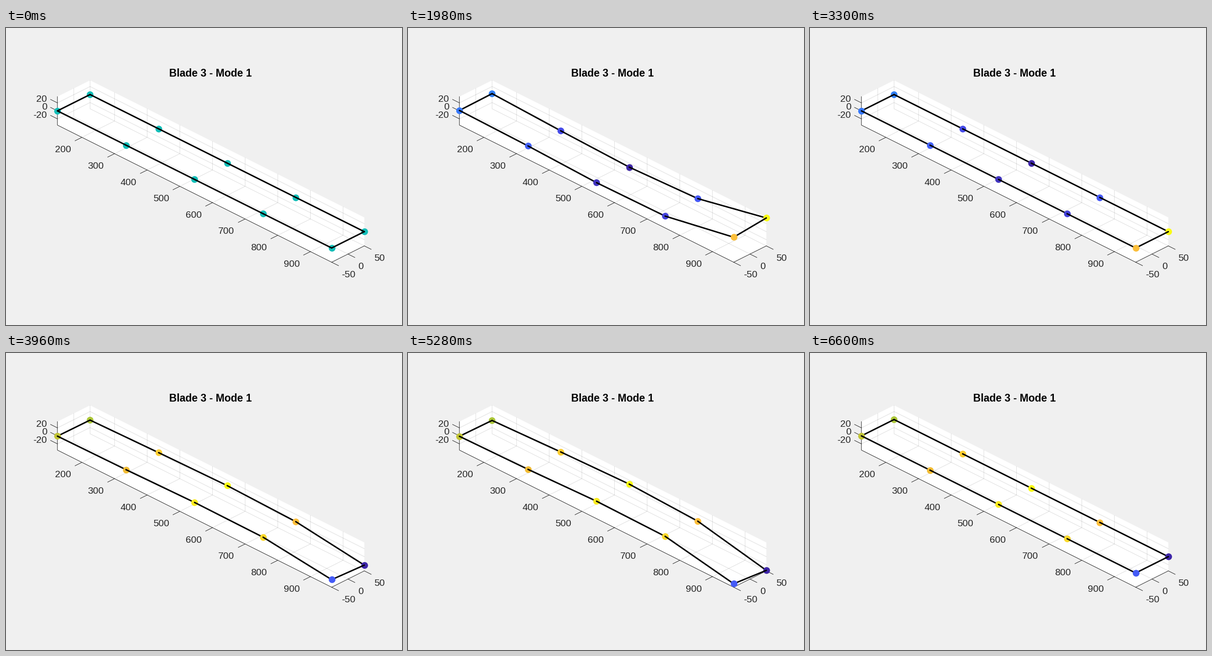
A matplotlib script that plays this animation: 864x648 px, repeating every 6930 ms.

```python
import numpy as np
import matplotlib.pyplot as plt
from matplotlib.animation import FuncAnimation
from matplotlib.colors import LinearSegmentedColormap

W, H, DPI = 864, 648, 150
FRAMES, INTERVAL = 21, 330
INK = "#262626"

plt.rcParams["font.family"] = "Liberation Sans"
fig = plt.figure(figsize=(W / DPI, H / DPI), dpi=DPI, facecolor="#f0f0f0")
ax = fig.add_axes([0, 0, 1, 1])
ax.set_xlim(0, W)
ax.set_ylim(H, 0)
ax.axis("off")

# Isometric view: pixels per data unit along the floor and upwards
X0, X1, Y0, Y1, ZLIM = 125, 965, -50, 50, 35.6
SX = 0.7123
SZ = SX * np.sqrt(1.5)


def project(x, y, z=0.0):
    u, v = (x - X0) * SX, (y - Y0) * SX
    return 112.2 + u + v, 180.8 + (u - v) / 2 - z * SZ


def path(*points, **style):
    ax.plot(*zip(*points), **style)


def label(x, y, text, ha, size=10, color=INK, **style):
    ax.text(x, y, text, ha=ha, va="baseline", fontsize=size, color=color, **style)


def draw_axes():
    lo, hi = -ZLIM, ZLIM
    walls = [(X0, Y0, lo), (X0, Y0, hi), (X0, Y1, hi), (X1, Y1, hi),
             (X1, Y1, lo), (X1, Y0, lo)]
    ax.fill(*zip(*[project(*p) for p in walls]), color="white", lw=0, zorder=0)

    grid = dict(color=INK, alpha=0.15, lw=0.5, zorder=1)
    line = dict(color=INK, lw=0.5, zorder=2)

    def tick(x, y, z, dx, dy):
        px, py = project(x, y, z)
        path((px, py), (px + dx, py + dy), **line)
        return px, py

    path(project(X0, Y0, hi), project(X0, Y0, lo), project(X1, Y0, lo),
         project(X1, Y1, lo), **line)

    for x in range(200, 1000, 100):
        path(project(x, Y0, lo), project(x, Y1, lo), project(x, Y1, hi), **grid)
        px, py = tick(x, Y0, lo, -15, 7.5)
        label(px - 23.4, py + 32.8, x, "right")

    for y in (-50, 0, 50):
        if y > Y0:
            path(project(X1, y, lo), project(X0, y, lo), project(X0, y, hi), **grid)
        px, py = tick(X1, y, lo, 15, 7.5)
        label(px + 21.5, py + 32.8, y, "left")

    for z in (-20, 0, 20):
        path(project(X0, Y0, z), project(X0, Y1, z), project(X1, Y1, z), **grid)
        px, py = tick(X0, Y0, z, -15, -7.5)
        label(px - 22.8, py - 2.5, z, "right")

    label(446.5, 106.5, "Blade 3 - Mode 1", "center", 11, "black", weight="bold")


cmap = LinearSegmentedColormap.from_list("mode", [
    (0, "#3e26a8"), (0.14, "#4852f4"), (0.24, "#3875fe"), (0.5, "#12beb9"),
    (0.72, "#abc739"), (0.8, "#e6bb2d"), (0.84, "#febe3c"), (1, "#f9fb15")])

# Mode shape as lift in pixels, root to tip along each edge
front = [1, -1.8, -7.4, -5.5, 24.7]
back = [2.1, -4.4, -9.2, -2.8, 31.4]
shape = np.array(front + back[::-1])
N = len(shape)

station = np.minimum(np.arange(N), np.arange(N)[::-1])
side = np.arange(N) // 5
base_x, base_y = project(X0 + station * (X1 - X0) / 4, Y0 + side * (Y1 - Y0))
near = 2.1 * station - side

draw_axes()
markers = [ax.plot([], [], "o", ms=np.sqrt(50), mew=0, zorder=10 + d)[0]
           for d in near]
edges = [ax.plot([], [], color="black", lw=1.5, solid_capstyle="round")[0]
         for _ in range(N)]


def update(k):
    lift = shape * np.sin(2 * np.pi * k / (FRAMES - 1))
    y = base_y - lift
    # colours span the current range of lift, however small it is
    flat = not lift.any()
    level = np.full(N, 0.5) if flat else (lift - lift.min()) / np.ptp(lift)

    for i in range(N):
        j = (i + 1) % N
        markers[i].set_data([base_x[i]], [y[i]])
        markers[i].set_color(cmap(level[i]))
        edges[i].set_data([base_x[i], base_x[j]], [y[i], y[j]])
        # a flat blade has its outline on top, a bent one sorts by depth
        edges[i].set_zorder(25 if flat else 10 + (near[i] + near[j]) / 2)
    return markers + edges


anim = FuncAnimation(fig, update, frames=FRAMES, interval=INTERVAL,
                     repeat=True, repeat_delay=0, blit=False)
plt.show()
```
